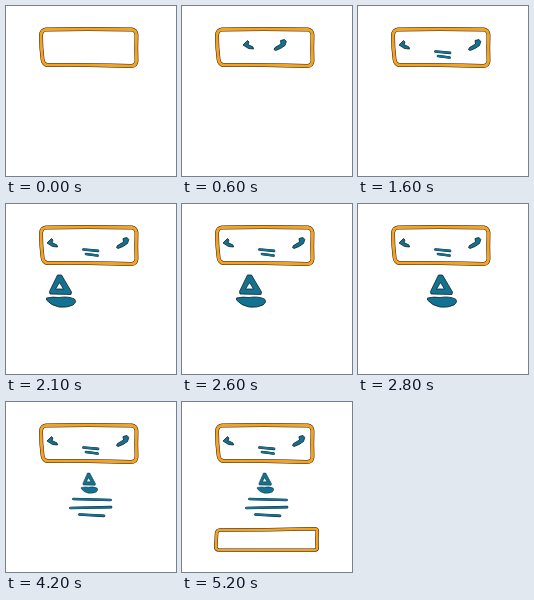
An HTML page with a canvas that plays this animation: 170x170 px, repeating every 7200 ms.

```html
<!DOCTYPE html>
<html lang="en">
<head>
<meta charset="utf-8">
<title>Sketch</title>
<style>
html, body { margin: 0; width: 100%; height: 100%; overflow: hidden; background: #fff; }
canvas { display: block; width: 100vw; height: 100vh; }
</style>
</head>
<body>
<canvas id="stage" width="170" height="170"></canvas>
<script>
const ctx = document.getElementById('stage').getContext('2d');
const LOOP = 7200;
const INK = '#15202a', TEAL = '#117391', ORANGE = '#f9a11b';

const topBox = new Path2D('M40 23.5 Q80 22.5 126 23.5 Q130 24 130.5 29 Q130 42 130.5 55 Q130 60 125 60 L105 59.5 Q70 58.5 41 59 Q37 58 36.5 53 Q35 42 35 29 Q35.5 24 40 23.5 Z');
const bottomBox = new Path2D('M38 128 Q85 128 133 126.8 Q135.5 127 135.3 130 Q134.5 138 135.2 146 Q135 148.3 131 148.2 L37 148 Q34 147.8 33.8 145 L34.6 131 Q35 128.2 38 128 Z');
const leftArrow = new Path2D('M41 39 L45.5 34.5 L47 36 L46 38.5 L51 41 L51.5 43 L46.5 42.5 Z');
const rightArrow = new Path2D('M110.5 43.5 L111.5 41.5 L117.5 38 L117 34.5 L121 33.5 L122.8 35.5 L121.5 39.5 L117 42.5 L112 44.5 Z');
const sail = new Path2D('M51.5 71 L55.5 71 L65.5 88 L65 90.5 L44 90 L43.5 87.5 Z M53.5 78.5 L49.5 85 L57.5 85 Z');
const hull = new Path2D('M40.5 94 Q47 92.5 53 93.5 Q62 92 68.5 95 Q71 98 67 101 Q61 104 53 103 Q45 101.5 40.5 96 Z');

function ribbon(path, width) {
  ctx.lineJoin = 'round';
  ctx.strokeStyle = INK;
  ctx.lineWidth = width + 1;
  ctx.stroke(path);
  ctx.strokeStyle = ORANGE;
  ctx.lineWidth = width;
  ctx.stroke(path);
}

function solid(path, dx = 0) {
  ctx.save();
  ctx.translate(dx, 0);
  ctx.fillStyle = TEAL;
  ctx.fill(path, 'evenodd');
  ctx.strokeStyle = INK;
  ctx.lineWidth = 0.8;
  ctx.stroke(path);
  ctx.restore();
}

function bar(x1, y1, x2, y2, width = 2) {
  ctx.lineCap = 'round';
  for (const [color, w] of [[INK, width + 0.7], [TEAL, width]]) {
    ctx.strokeStyle = color;
    ctx.lineWidth = w;
    ctx.beginPath();
    ctx.moveTo(x1, y1);
    ctx.lineTo(x2, y2);
    ctx.stroke();
  }
  ctx.lineCap = 'butt';
}

function dashed(path, pattern) {
  ctx.save();
  ctx.strokeStyle = '#222';
  ctx.lineWidth = 1;
  ctx.setLineDash(pattern);
  ctx.stroke(new Path2D(path));
  ctx.restore();
}

function drawArrows(t) {
  if (t < 500) return;
  const left = 6 - Math.min(6, Math.floor((t - 500) / 100));
  solid(leftArrow, left * 4);
  solid(rightArrow, -left * 3.7);
  if (left === 2) dashed('M24.5 31 V50', [8, 3, 2, 3]);
  if (left === 1) dashed('M12.5 31 V50', [8, 3, 2, 3]);
}

function drawBoat(t) {
  if (t < 2100) return;
  const shift = t < 2600 ? 0 : t < 2800 ? 14 : 29;
  ctx.save();
  if (t >= 3200) {
    ctx.translate(83.5, 71);
    ctx.scale(0.57, 0.63);
    ctx.translate(-84, -71);
  }
  solid(sail, shift);
  solid(hull, shift);
  ctx.restore();
  if (t >= 3000 && t < 3200) dashed('M65.5 64.5 H101.5 V106.5 H65.5 Z', [3, 1]);
  if (t >= 3200 && t < 4200) dashed('M78 96.5 H89', [3, 1]);
}

function draw(t) {
  ctx.fillStyle = '#fff';
  ctx.fillRect(0, 0, 170, 170);
  ribbon(topBox, 2.9);
  drawArrows(t);
  if (t >= 1600) {
    bar(77.5, 45.5, 92, 46.8);
    bar(80, 50, 91.5, 51.5);
  }
  drawBoat(t);
  if (t >= 4200) {
    bar(67.5, 97, 104.5, 98);
    bar(64.5, 106, 105, 105.2);
    bar(73.5, 112.5, 98, 113.8);
  }
  if (t >= 5200) ribbon(bottomBox, 2.6);
}

const start = performance.now();
function tick() {
  draw((performance.now() - start) % LOOP);
  requestAnimationFrame(tick);
}
tick();
</script>
</body>
</html>
```
